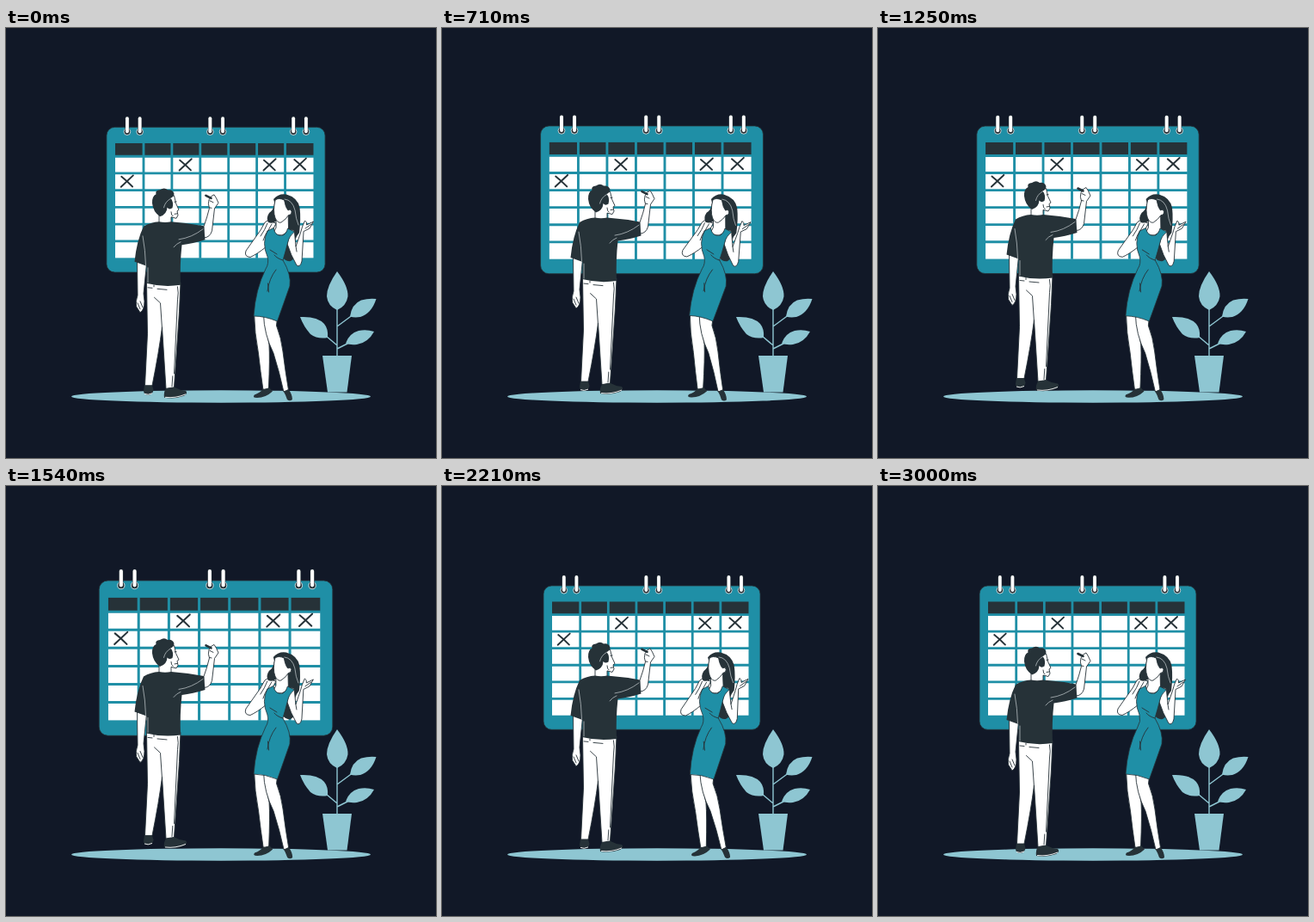
An HTML page for the animation above (3.04 s loop, 500 by 500 pixels).

```html
<!DOCTYPE html>
<html lang="en">
<head>
<meta charset="utf-8">
<title>Planning calendar</title>
<style>
html, body { margin: 0; width: 100%; height: 100%; overflow: hidden; background: #111827; }
svg { display: block; width: 100vw; height: 100vh; }
.ink { fill: #263238; }
.skin { fill: #fff; stroke: #263238; stroke-width: .9; stroke-linejoin: round; }
.teal { fill: #1f8fa6; stroke: #263238; stroke-width: .8; }
.pale { fill: #8ec6d2; }
.line { fill: none; stroke: #263238; stroke-width: .9; stroke-linecap: round; }
.glint { fill: none; stroke: #c9d0d3; stroke-width: .7; stroke-linecap: round; }
</style>
</head>
<body>
<svg viewBox="0 0 500 500">
  <g id="calendar">
    <rect class="teal" x="118" y="116" width="252" height="167.3" rx="9.5"/>
    <rect class="ink" x="128" y="134.5" width="228.5" height="15"/>
    <rect x="128" y="149.5" width="228.5" height="117.2" fill="#fff"/>
    <path id="grid" stroke="#1f8fa6" stroke-width="2.8"/>
    <g id="marks" class="line" style="stroke-width:1.9"></g>
    <g id="rings"></g>
  </g>

  <ellipse class="pale" cx="250" cy="428.5" rx="174" ry="7.2"/>

  <g class="pale">
    <path d="M368 381H402L396.500 423.500H374Z"/>
    <path d="M385 283Q398 300 397.500 312Q396 323 385 328Q374 323 373 312Q373 300 385 283Z"/>
    <path d="M430.500 315Q425 332 412 336Q405 337 400 335.500Q402 321 413 316.500Q422 314 430.500 315Z"/>
    <path d="M342 336Q362 335 370 344Q375 350 374 360Q362 362 354 356Q346 347 342 336Z"/>
    <path d="M428 353Q421 366 408 368Q400 369 395 366.500Q399 355 410 352Q419 350 428 353Z"/>
    <path d="M385 381V320M385 347L404 333M385 369L372 358M385 373L399 366" fill="none" stroke="#8ec6d2" stroke-width="1.4"/>
  </g>

  <g id="man">
    <path class="skin" d="M152.500 272L153 311Q150.500 318 151.500 324L156 331Q161 328 161 318L160 309L163.500 274Z"/>
    <path class="line" d="M153 320L156 327M156 318L159 325"/>
    <path class="skin" d="M161.500 416L164.500 356L163.500 296H203L201.500 330L195.500 418L186 419.500L181.500 348Q178 376 170 416Z"/>
    <path class="line" d="M181.500 350L179.500 320L172.500 313.500M165 302L170 302.500M176 303.500L187 304.500M199.500 301Q201 308 199.500 316L195.500 402M193.800 405L193 417M172 299V301"/>
    <path class="ink" d="M161 416H170L171.500 421Q171 426.500 165 427Q160 426.500 160 422Z"/>
    <path class="ink" d="M186 419.500L196 418Q202 421.500 209 422Q212 425 207 428Q196 432 184 430Q183 424 186 419.500Z"/>
    <path d="M161 425.500Q165 427.500 170 425M185 429.500Q197 431 209 426" fill="none" stroke="#fff" stroke-width=".9"/>
    <path class="skin" d="M230 231Q234 220 236.500 209.500Q234.500 205 236 200Q238 195 242 194L244.500 198L247 203.500L242.500 210L239.500 236Q237 244 230 244Z"/>
    <path class="line" d="M237 201L241 203M236.500 209L239 209.500"/>
    <path d="M232.500 195L238.500 198" fill="none" stroke="#263238" stroke-width="2.6" stroke-linecap="round"/>
    <path class="skin" d="M178 228V214L184 198L195.500 195L197.500 204L201 211.500L199 213L200 218L198 221.500L192 220V228Z"/>
    <path class="ink" d="M179 219.500Q171 214 170 204Q169.500 196 174.500 193.500Q173 189 179 188.500Q184 185 188 188.500Q194 187.500 195.500 193Q195 196.500 191.500 198Q195.500 203 193.500 209.500Q190 212 187.500 209Q187 217 179 219.500Z"/>
    <path class="glint" d="M191.500 198.500Q185 202 183.500 209"/>
    <path class="line" d="M196 202.500L198 202M196 216.500L199 216M192 214Q192 218 194 219"/>
    <path class="ink" d="M160 231Q168 226 178 225.500Q185 227 192 225.500Q212 227 230 230.500L231.500 246.500Q217 251 204.500 252.500Q202 275 203 299Q183 302 163 297L163.500 277L149.500 272Q152 247 160 231Z"/>
    <path class="glint" d="M159 242Q162 258 162.500 276M229 234Q216 244 201 246M203 249Q198 251 195 255M165 279V296"/>
  </g>

  <g id="woman">
    <path class="ink" d="M311 199Q317 192 326 193.500Q339 197 341.500 209Q343 222 341 238Q334 246 336 256Q338 268 331 271Q325 272 321 266L322 240Z"/>
    <path class="skin" d="M288.500 330L302 335Q302 350 306 368Q307 384 305.500 419L299 420.500Q296 400 293.500 378Q289 355 288.500 330Z"/>
    <path class="skin" d="M299.500 333H316L314.500 346Q320 360 322 376Q325 400 328.500 420.500L323 423Q318 400 311 378Q300 356 299.500 333Z"/>
    <path class="ink" d="M299 419.500Q296 424 289 426.500Q286 430 292 430Q302 430 310 422.500L306 418Q303 421 299 419.500ZM322.500 422Q326 423 328.500 420Q333 426 333 432Q330 434.500 327 432Q325 426 322.500 422Z"/>
    <path class="skin" d="M331 235Q335 234 335.500 238L337 254L342.500 238L344.500 231L347.500 224Q350 225 349.500 229L357.500 225L353 233L346 236.500L344 271Q342 279 338 276Q331 264 327 251Z"/>
    <path class="line" d="M348 233L355 228M337 254L338 260"/>
    <path class="skin" d="M304 224L301 226L296 235L279 259Q276.500 266 284 266.500Q292 263 303 254Q301 244 304 236L310 235L314 227Z"/>
    <path class="line" d="M304 227Q301 235 296 242M309 228L305 235Q301 240 299 247"/>
    <path class="ink" d="M312 204Q311 212 306 215Q302 221 305 226Q310 228 315 224Z"/>
    <path class="skin" d="M314 222L328 212L328.500 234Q322 246 311 238L314 232Z"/>
    <path class="skin" d="M313 200Q310 213 313 221Q316 227.500 320 226Q326 222 328.500 217.500Q332 217.500 332 213.500Q331 210 328 212Q325 209 323.500 200Q317 197 313 200Z"/>
    <path class="glint" d="M324 199Q333 200 336 212Q337 222 340 229"/>
    <path class="teal" d="M304 236L311 232.500Q313 243 322 241Q326 239 327.500 233L335.500 237Q329 242 327.500 250Q325 260 322 270Q332 287 330 300Q323 320 315.500 341Q301 335 288 335Q290 304 302 280Q306 274 304 266Q297 250 304 236Z"/>
    <path class="line" d="M307 258L315 263M322 270Q315 268 312 264M314 281Q306 291 304 306M304.500 297L305.500 307"/>
  </g>
</svg>

<script>
const $ = id => document.getElementById(id);
const range = n => [...Array(n).keys()];
const LOOP = 3040, CYCLE = 3000, LEAD = 25;

$('grid').setAttribute('d', range(6).map(i =>
  `M${160.7 + 32.63 * i} 134V267M127.500 ${149.6 + 19.55 * i}H357`
).join(''));

$('marks').innerHTML = [[209, 159.2], [306, 159.2], [341, 158.6], [141.700, 178.2]].map(([x, y]) =>
  `<path d="M${x - 6.5} ${y - 5.2}Q${x} ${y} ${x + 6.2} ${y + 6.4}M${x + 7} ${y - 6.6}Q${x} ${y} ${x - 7} ${y + 6.6}"/>`
).join('');

$('rings').innerHTML = [141.8, 156.4, 237.4, 252, 333.4, 348].map(x => `
  <circle cx="${x}" cy="121.3" r="3.8" fill="#263238" stroke="#fff" stroke-width=".7"/>
  <path d="M${x} 105.900V121" stroke="#263238" stroke-width="4.8" stroke-linecap="round"/>
  <path d="M${x} 105.900V121" stroke="#fff" stroke-width="3.8" stroke-linecap="round"/>`
).join('');

// Linear interpolation through [position, value] stops
function track(u, stops) {
  const i = Math.max(1, stops.findIndex(([p]) => u <= p));
  const [p0, v0] = stops[i - 1], [p1, v1] = stops[i];
  return v0 + (v1 - v0) * (u - p0) / (p1 - p0);
}

const pulse = [[0, 1], [.1, 1.1], [.3, 1], [.4, 1], [.5, 1.1], [.6, 1], [1, 1]];
const rise = [[0, 0], [.5, -10], [1, 0]];
const sway = [[0, 0], [.25, 1], [.75, -1], [1, 0]];

function draw(now) {
  const u = Math.min(1, (now + LEAD) % LOOP / CYCLE);
  $('calendar').setAttribute('transform', `translate(244 193.7) scale(${track(u, pulse)}) translate(-244 -193.7)`);
  $('man').setAttribute('transform', `translate(0 ${track(u, rise)})`);
  $('woman').setAttribute('transform', `rotate(${track(u, sway)} 318 312.5)`);
}

const start = performance.now();
function frame() {
  draw(performance.now() - start);
  requestAnimationFrame(frame);
}
frame();
</script>
</body>
</html>
```
